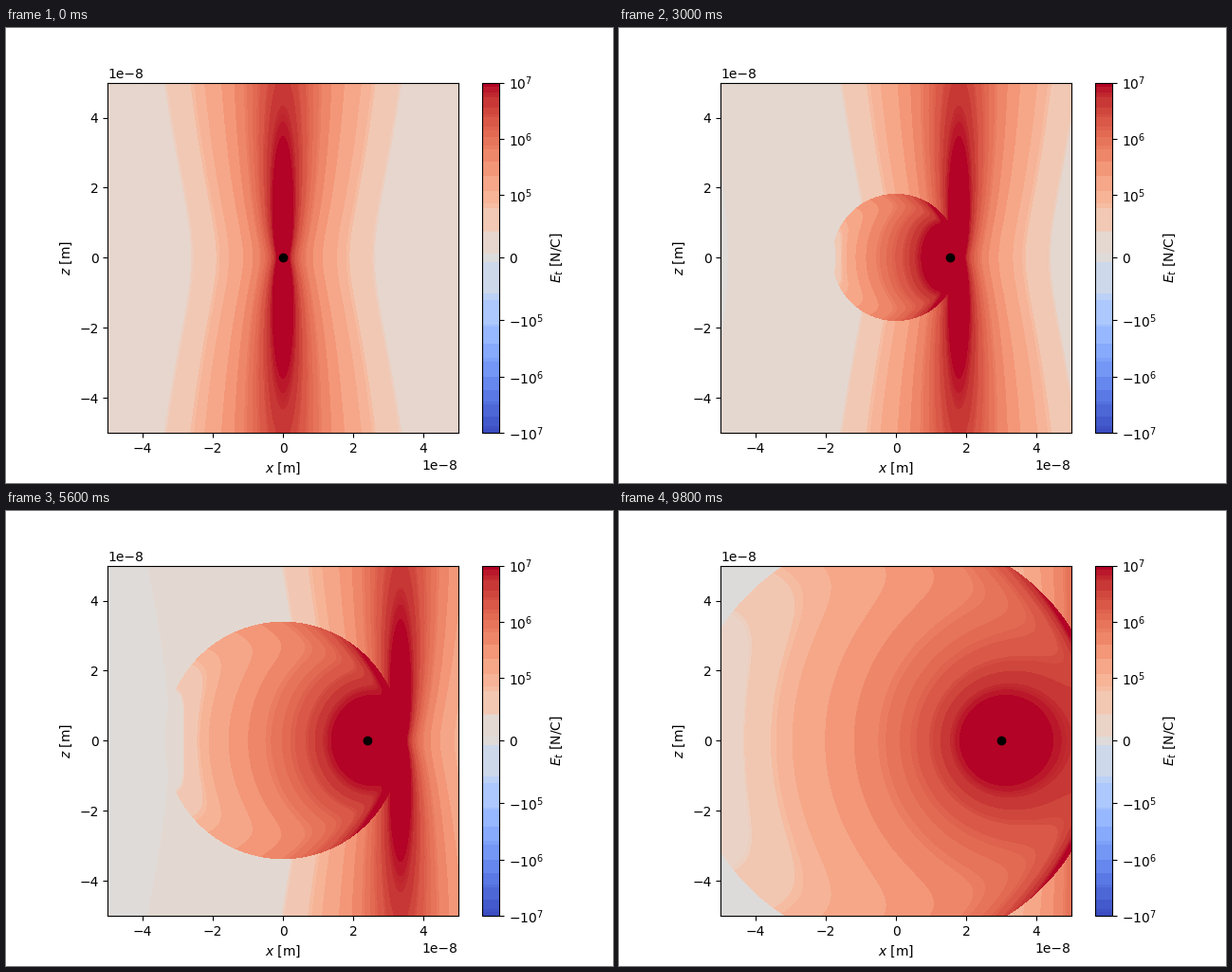
Write a matplotlib script that moves like this. It is 640 by 480 pixels and loops after 10000 ms.

```python
import numpy as np
import matplotlib.pyplot as plt
from matplotlib.animation import FuncAnimation
from matplotlib.colors import ListedColormap, SymLogNorm
from matplotlib.ticker import FuncFormatter

# Lengths in nm, times as c*t in nm.
FRAMES = 50
LIM = 50
N = 370
BETA0 = 0.99
STOP_X = 30
STOP_T = 2 * STOP_X / BETA0
DECEL = BETA0 / STOP_T
KQ = 1.44e9  # e / (4 pi eps0) in N/C * nm^2

grid = np.linspace(-LIM, LIM, N)
X, Z = np.meshgrid(grid, grid[N // 2:])
RADIUS = np.hypot(X, Z)


def position(t):
    return BETA0 * t - DECEL * t**2 / 2


def uniform_field(x, z):
    """Field of a charge in steady motion, x measured from the charge."""
    g2 = 1 / (1 - BETA0**2)
    return KQ * np.sqrt(g2) * np.hypot(x, z) / (g2 * x**2 + z**2) ** 1.5


def retarded_time(x, z, t):
    lo, hi = np.zeros_like(x), np.full_like(x, t)
    for _ in range(36):
        mid = (lo + hi) / 2
        early = t - mid > np.hypot(x - position(mid), z)
        lo = np.where(early, mid, lo)
        hi = np.where(early, hi, mid)
    return (lo + hi) / 2


def braking_field(x, z, t):
    """Lienard-Wiechert field of the decelerating charge."""
    tr = retarded_time(x, z, t)
    dx = x - position(tr)
    r = np.hypot(dx, z)
    nx, nz = dx / r, z / r
    beta = BETA0 - DECEL * tr
    kappa = 1 - nx * beta
    near = (1 - beta**2) / r**2
    far = -DECEL * nx / r
    ex = (nx - beta) * (near + far) + DECEL * kappa / r
    ez = nz * (near + far)
    return KQ * np.hypot(ex, ez) / kappa**3


def total_field(t):
    field = uniform_field(X - BETA0 * t, Z)
    inside = RADIUS < t
    if inside.any():
        field[inside] = braking_field(X[inside], Z[inside], t)
    return np.vstack([field[::-1], field])


# Colours fall into coarse RGB cells; each cell shows its mean colour.
lut = plt.get_cmap("coolwarm")(np.arange(256), bytes=True)[:, :3].astype(int)
cells = (lut[:, 0] >> 5) * 128 + (lut[:, 1] >> 4) * 8 + (lut[:, 2] >> 5)
_, cell = np.unique(cells, return_inverse=True)
BAR_WEIGHT = 26.6  # colorbar pixels per colour

norm = SymLogNorm(linthresh=1e5, linscale=1, vmin=-1e7, vmax=1e7, base=10)


def banded_cmap(field):
    index = np.clip((norm(field.ravel()) * 256).astype(int), 0, 255)
    weight = np.bincount(index, minlength=256) + BAR_WEIGHT
    total = np.bincount(cell, weight)
    means = [np.bincount(cell, weight * lut[:, k]) / total for k in range(3)]
    return ListedColormap(np.stack(means, axis=1)[cell] / 255)


def power_label(value, _):
    if value == 0:
        return r"$\mathdefault{0}$"
    sign = "-" if value < 0 else ""
    power = round(np.log10(abs(value)))
    return rf"$\mathdefault{{{sign}10^{{{power}}}}}$"


fig, ax = plt.subplots(figsize=(6.4, 4.8), dpi=100)
edge = LIM * 1e-9
start = total_field(0)
image = ax.imshow(start, cmap=banded_cmap(start), norm=norm, origin="lower",
                  extent=[-edge, edge, -edge, edge], interpolation="nearest")
charge = ax.scatter([0], [0], c="black", zorder=3)
ax.set_xlim(-edge, edge)
ax.set_ylim(-edge, edge)
ax.set_xlabel("$x$ [m]")
ax.set_ylabel("$z$ [m]")
bar = fig.colorbar(image, ax=ax, ticks=[-1e7, -1e6, -1e5, 0, 1e5, 1e6, 1e7],
                   format=FuncFormatter(power_label))
bar.minorticks_off()
bar.set_label("$E_t$ [N/C]")


def update(frame):
    t = STOP_T * frame / FRAMES
    field = total_field(t)
    image.set_data(field)
    image.set_cmap(banded_cmap(field))
    charge.set_offsets([[position(t) * 1e-9, 0]])
    return image, charge


anim = FuncAnimation(fig, update, frames=FRAMES, interval=200,
                     repeat=True, repeat_delay=0)
plt.show()
```
